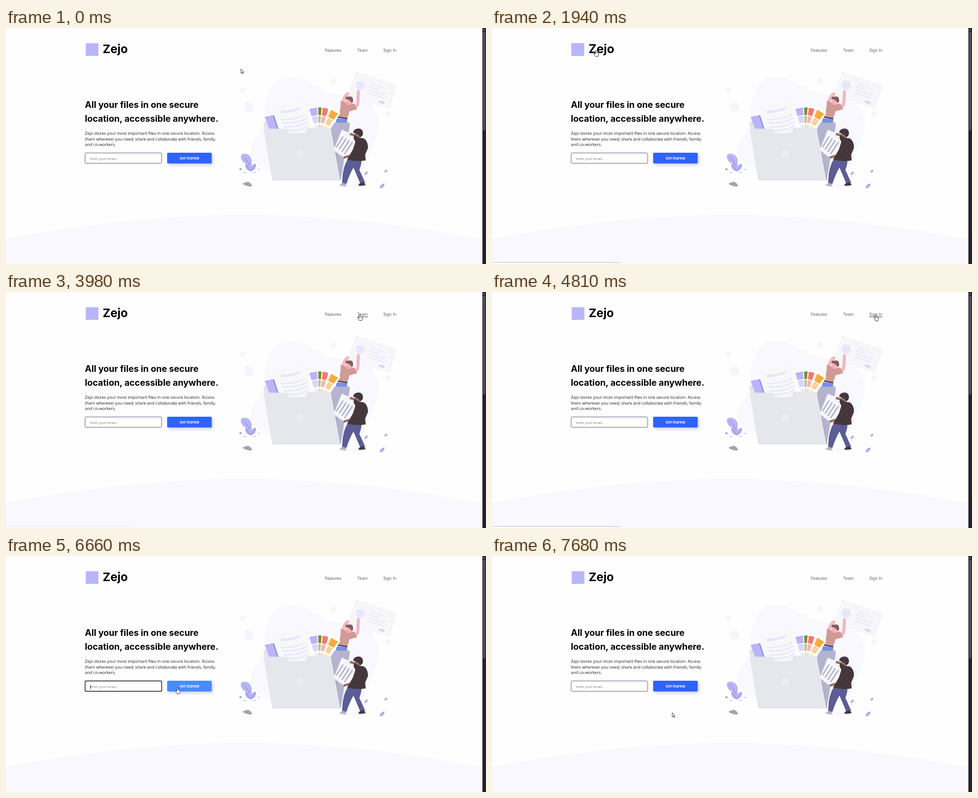
An HTML page for the animation above (8000 ms loop, 1065 px wide and 526 px high).

```html
<!DOCTYPE html>
<html lang="en">
<head>
<meta charset="utf-8">
<title>Zejo landing page</title>
<style>
html, body { margin: 0; width: 100%; height: 100%; overflow: hidden; background: #fefefe; }
svg { display: block; position: absolute; left: 0; top: 0; }
text { font-family: Inter, sans-serif; fill: #000; white-space: pre; }
.head { font-size: 19.6px; font-weight: 700; }
.copy { font-family: "Open Sans", sans-serif; font-size: 9.2px; fill: #1c1c22; }
.nav { font-size: 9.1px; font-weight: 300; fill: #2d2d52; }
.hint { font-family: "Open Sans", sans-serif; font-size: 7.3px; fill: #757575; }
#button rect { filter: drop-shadow(3px 4px 3px rgba(70, 80, 160, .25)); }
</style>
</head>
<body>
<svg width="1065" height="526" viewBox="0 0 1065 526">
  <defs>
    <g id="leaf">
      <path d="M-10 0Q0 -10 10 0Q0 10 -10 0Z" fill="#b9b6fa"/>
      <path d="M-10 0H10" stroke="#7f7cc8"/>
    </g>
  </defs>
  <path fill="#f8f8fe" d="M0 469Q285 417 530 417T1057 471V526H0Z"/>

  <g id="logo">
    <rect x="177" y="34" width="28" height="28" fill="#b9b5fb"/>
    <text x="214.5" y="55.5" font-size="26" font-weight="700">Zejo</text>
  </g>
  <text class="nav" x="707.5" y="53">Features</text>
  <text class="nav" x="779" y="53">Team</text>
  <text class="nav" x="837" y="53">Sign In</text>
  <path id="underline" stroke="#2d2d52"/>

  <text class="head" x="175" y="178">All your files in one secure</text>
  <text class="head" x="175" y="208.5">location, accessible anywhere.</text>
  <text class="copy" x="175" y="238">Zejo stores your most important files in one secure location. Access</text>
  <text class="copy" x="175" y="250.7">them wherever you need, share and collaborate with friends, family,</text>
  <text class="copy" x="175" y="263.3">and co-workers.</text>

  <rect id="field" x="175.5" y="278.5" width="170" height="23" rx="2.5" fill="#fff"/>
  <text class="hint" x="187" y="294">Enter your email...</text>
  <path id="caret" d="M187.5 287.5V296" stroke="#000"/>
  <g id="button">
    <rect x="357.5" y="278" width="99" height="24" rx="2.5"/>
    <text x="407" y="293" text-anchor="middle" font-size="7.7" font-weight="700" style="fill:#fff">Get Started</text>
  </g>

  <!-- backdrop -->
  <g fill="#f5f5fd">
    <path d="M576 165C580 140 595 108 630 109C678 110 685 142 738 147C785 150 827 166 827 217C827 250 795 292 790 325L590 317C560 312 544 294 544 273C544 247 567 242 571 210C574 190 573 182 576 165Z" fill="#f8f8fe"/>
    <ellipse cx="768" cy="352" rx="34" ry="3.5" fill="#f8f8fe"/>
    <circle cx="525" cy="139" r="6.5"/><circle cx="538.5" cy="176" r="11"/>
    <circle cx="727" cy="118" r="6.5"/><circle cx="848" cy="192" r="6.5"/>
  </g>

  <!-- certificate, drawn level and tilted -->
  <g transform="translate(777 99.5) rotate(17.7)">
    <rect width="93" height="52.5" fill="#f7f7f9" stroke="#ececf0"/>
    <circle cx="17" cy="24.5" r="10" fill="#e7e7fc"/>
    <path d="M39 14H75M39 21H61M39 28H76M39 35H75" stroke="#e9e9fc" stroke-width="2.6"/>
    <rect x="68" y="43" width="12" height="5" fill="#d6d5fb"/>
  </g>

  <!-- upper figure -->
  <path d="M734 201L757 203V213H731Z" fill="#7590ea"/>
  <g fill="none" stroke="#f4b8bd" stroke-width="7" stroke-linejoin="round">
    <path d="M748 165Q751 150 761 145"/>
    <path d="M774 176Q781 176 781 158L782 139"/>
  </g>
  <path d="M754 158L768 160V168L764 173L754 171Z" fill="#f1b3b5"/>
  <path d="M743 162L752 165L758 172L773 168L779 181L762 186L757 203L736 199Q741 188 742 177Z" fill="#d09a95"/>
  <path d="M753 158Q753 152 760 153Q769 151 770 159Q771 166 767 167Q764 160 753 158Z" fill="#7d6062"/>
  <path d="M736 198.5L757 202" stroke="#47353a" stroke-width="2.3"/>

  <!-- folder -->
  <path d="M718 211H759Q763 211 763 215L743 338Q742 341 737 340Z" fill="#b4b4ce"/>
  <path d="M571 211L578 208L586 225H574Z" fill="#e2e3ee"/>
  <path d="M574 198L594 194L605 225H584Z" fill="#b8b5fb"/>
  <path d="M592 194.5H595L606 225H602Z" fill="#918fd9"/>
  <path d="M670 176L721 175L742 189L721 224H676Z" fill="#fff"/>
  <g id="swatches"></g>
  <path d="M588 172L668 162L675 219L664 234H628L605 226Z" fill="#f8f8fa"/>
  <path d="M610 187Q633 187 652 178.500" fill="none" stroke="#e5e5fb" stroke-width="5"/>
  <path id="script" fill="none" stroke="#e5e5fb" stroke-width="2.6"/>
  <path d="M574 224.500H624L626 232Q627 234.500 630 234.500H661Q664 234.500 665 232L667 225Q668 222.500 671 222.500H718Q721.500 222.500 722 226L742 337Q742 340 738 340H594Q590.500 340 590 336L572 227Q572 224.500 574 224.500Z" fill="#e6e7ec"/>
  <path d="M722 226L742 337" stroke="#9697b5"/>
  <g fill="none" stroke="#fff" stroke-width="1.2">
    <circle cx="651" cy="281.5" r="7.5"/><path d="M651 285.500V278M648 281L651 278L654 281"/>
  </g>

  <!-- carrier -->
  <path d="M745 226.500L778 241L752 291L727 272Z" fill="#f6f6f8"/>
  <path id="bars" stroke="#b1b2cc" stroke-width="3"/>
  <path d="M763 236L776 240M749 289L763 285" stroke="#9c6b65" stroke-width="5"/>
  <path d="M758 293L789 291Q789 304 784 316L797 345L787 349L771 311Q763 324 755 348L746 346Q746 312 758 293Z" fill="#5b5d94"/>
  <path d="M746 345L754 347L755 353Q744 353 740 350Z" fill="#b6b5c8"/>
  <path d="M785 346L794 344L798 350Q788 353 781 351Z" fill="#44383c"/>
  <path d="M774 235H785L787 246H777Z" fill="#9c6b65"/>
  <path d="M770 233Q772 224 783 224Q792 225 792 235Q791 243 785 243Q784 237 770 233Z" fill="#41363a"/>
  <path d="M773 238L784 245L794 246Q804 253 803 268L797 282L798 295Q778 299 757 293L770 270L775 254L771 245Z" fill="#45383c"/>
  <path d="M793 259L791 276L762 290" fill="none" stroke="#362b2f"/>

  <!-- plants and stone -->
  <path d="M543 319Q546 303 545 293Q541 281 530 280Q520 280 521 288Q523 299 532 302Q541 306 543 319Z" fill="#b8b5f9"/>
  <path d="M543 319Q542 300 526 286" fill="none" stroke="#6664a5" stroke-width=".7"/>
  <use href="#leaf" transform="translate(537 311) rotate(55)"/>
  <use href="#leaf" transform="translate(548.5 311) rotate(-55)"/>
  <use href="#leaf" transform="translate(799 324) rotate(-45) scale(.55)"/>
  <use href="#leaf" transform="translate(843 319) rotate(-35) scale(.45)"/>
  <use href="#leaf" transform="translate(834.5 352) rotate(-45) scale(.75)"/>
  <path d="M527 322H533M548 322H554M559 315H564" stroke="#c5c3fa" stroke-width="2"/>
  <path d="M517 316L520 311L524 317Z" fill="#a2a2ad"/>
  <path d="M525 347Q531 343 538 343Q544 345 546 353Q532 354 525 347Z" fill="#a3a3ac"/>

  <!-- browser chrome -->
  <path id="status" d="M-1 522.500H282.500V527H-1Z" fill="#fcfcfd" stroke="#b4b4bd"/>
  <rect x="1057" width="8" height="526" fill="#23222d"/>
  <rect x="1058.5" y="8" width="5" height="220" rx="1" fill="#505061"/>
  <path d="M1059 5L1061 2.500L1063 5Z" fill="#b8b8c2"/>

  <g id="cursor" stroke="#111" stroke-width=".9" stroke-linejoin="round" fill="#fff">
    <path id="arrow" d="M.4.400V9.700L2.400 7.900L4 11.200L5.500 10.500L4 7.300H6.700Z"/>
    <path id="hand" d="M-1.300 8V1.200Q-1.300 0 0 0T1.300 1.200V5L5.200 6Q6 6.300 6 7.400L4.500 13.500H-1L-4.200 8.800Q-4.800 7.500-3.600 7.200Q-2.600 7-1.300 8.600Z"/>
  </g>
</svg>
<script>
const LOOP = 8000;
const $ = id => document.getElementById(id);
const clamp = v => Math.max(0, Math.min(1, v));
const repeat = (n, rule) => Array.from({ length: n }, (_, i) => rule(i)).join("");

// Fan of colour cards: rings of cells around one pivot, paler towards it.
function fan(tilt, spread, fill) {
  const at = (r, deg) => {
    const a = deg * Math.PI / 180;
    return `${694 + r * Math.sin(a)} ${250 - r * Math.cos(a)}`;
  };
  return repeat(3, ring => {
    const far = 73 - 19 * ring, near = far - 17 + 2 * ring;
    const a = tilt - spread, b = tilt + spread;
    return `<path d="M${at(far, a)}L${at(far, b)}L${at(near, b)}L${at(near, a)}Z" fill="${fill}" opacity="${.55 ** ring}"/>`;
  });
}
$("swatches").innerHTML = fan(-10, 7, "#b9b5f9") + fan(2, 3, "#7e8b31")
  + fan(12, 5, "#f4796f") + fan(29, 7, "#f4ac3d");
$("script").setAttribute("d", repeat(4, i => `M${609 + 4 * i} ${204 + 8.4 * i}q38 0 ${58 - 3 * i} -12`));
$("bars").setAttribute("d", repeat(4, i => `M${748 + 7 * i} ${242 + 4 * i}l-${15 + i} ${24 + i}`));

// Pointer trips with rests between them; bow bends a trip up or down.
const home = [521, 91];
const trips = [
  { from: 490, to: 1280, end: [226, 34], bow: -42 },
  { from: 1300, to: 1440, end: [230.5, 50] },
  { from: 1940, to: 2890, end: [685, 62] },
  { from: 2890, to: 3610, end: [733, 53] },
  { from: 3690, to: 3980, end: [785, 50] },
  { from: 3980, to: 4440, end: [819, 50] },
  { from: 4510, to: 4650, end: [852, 51] },
  { from: 5030, to: 5770, end: [402, 270] },
  { from: 5850, to: 6590, end: [380.5, 293.5] },
  { from: 6740, to: 7400, end: [399.5, 349] }
];

function pointer(t) {
  let [x, y] = home;
  for (const { from, to, end, bow = 0 } of trips) {
    const k = clamp((t - from) / (to - from));
    const ease = (1 - Math.cos(Math.PI * k)) / 2;
    x += (end[0] - x) * ease;
    y += (end[1] - y) * ease + bow * Math.sin(Math.PI * ease);
    if (k < 1) break;
  }
  return [x, y];
}

const area = (left, top, right, bottom) => ({ left, top, right, bottom });
const navLink = (left, right) => area(left, 43, right, 57);
const links = [navLink(708, 745), navLink(779, 803), navLink(837, 866)];
const logo = area(175, 36, 271, 62);
const button = area(357, 278, 457, 302);

const over = (a, t) => {
  const [x, y] = pointer(t);
  return x >= a.left && x <= a.right && y >= a.top && y <= a.bottom;
};

// The pointer visits each area once, so its hover has one start and one end.
for (const a of [logo, button, ...links]) {
  const times = Array.from({ length: LOOP / 5 }, (_, i) => i * 5).filter(t => over(a, t));
  a.start = times[0];
  a.stop = times[times.length - 1];
}
const fade = (t, a, delay, rise) =>
  Math.min(clamp((t - a.start - delay) / rise), 1 - clamp((t - a.stop) / rise));

const focus = { start: 6640, stop: 7490 };
const show = (id, on) => $(id).setAttribute("visibility", on ? "visible" : "hidden");

function draw(t) {
  const link = links.find(a => over(a, t));
  const hand = link || over(logo, t) || over(button, t);
  $("cursor").setAttribute("transform", `translate(${pointer(t)})`);
  show("hand", hand);
  show("arrow", !hand);

  const grow = 1 + .025 * fade(t, logo, 0, 140);
  $("logo").setAttribute("transform", `translate(223 48) scale(${grow}) translate(-223 -48)`);
  $("underline").setAttribute("d", link ? `M${link.left} 55.5H${link.right}` : "");
  $("status").setAttribute("opacity", Math.max(...[logo, ...links].map(a => fade(t, a, 40, 140))));

  const glow = fade(t, button, 0, 200);
  const mix = (a, b) => Math.round(a + (b - a) * glow);
  $("button").setAttribute("fill", `rgb(${mix(47, 72)},${mix(99, 140)},${mix(253, 255)})`);

  const focused = t >= focus.start && t < focus.stop;
  $("field").setAttribute("stroke", focused ? "#000" : "#55547f");
  $("field").setAttribute("stroke-width", focused ? 1.4 : 1);
  show("caret", focused && (t - focus.start) % 1000 < 500);
}

function tick() {
  draw(performance.now() % LOOP);
  requestAnimationFrame(tick);
}
tick();
</script>
</body>
</html>
```
